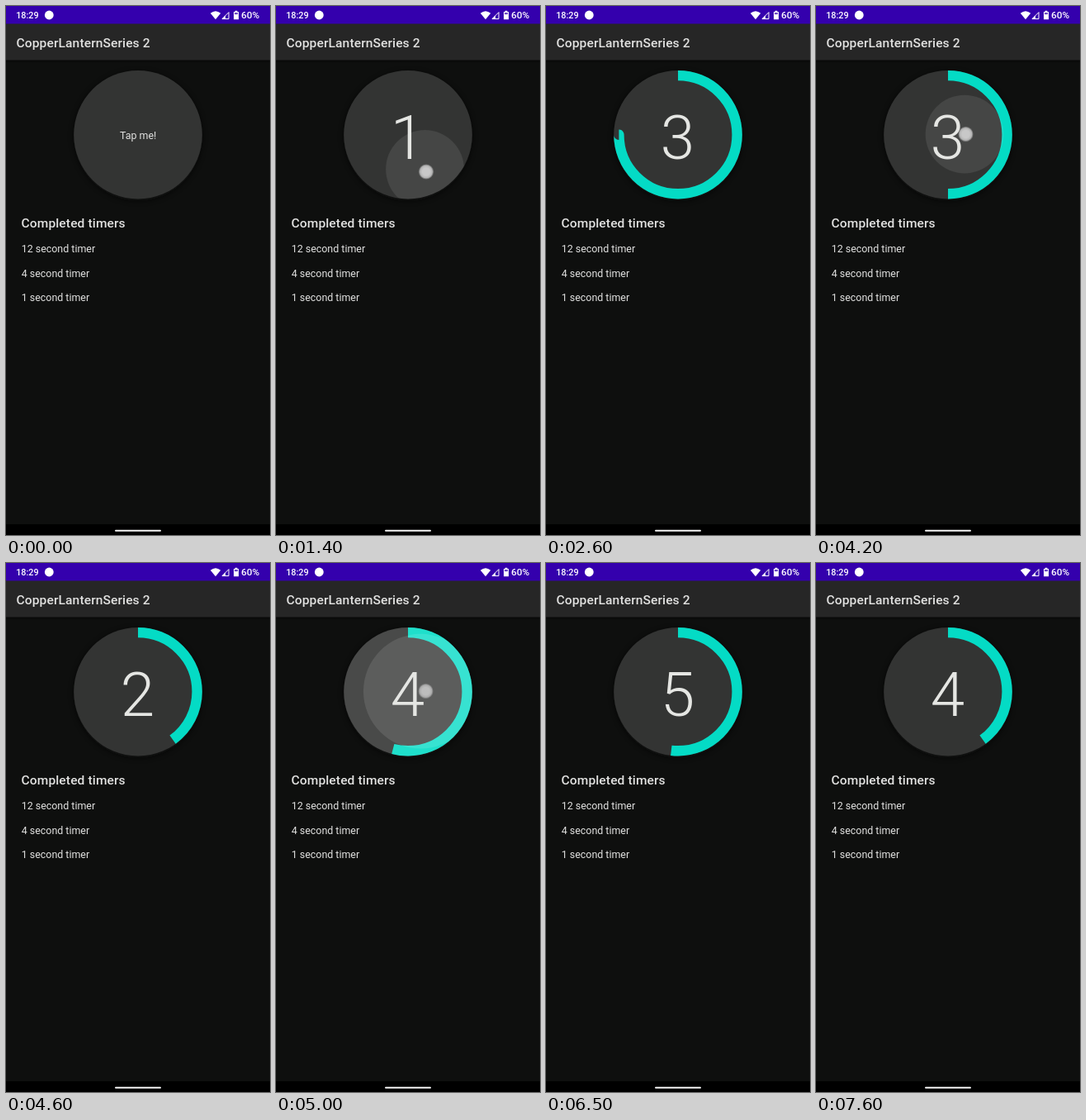
Recreate the animation shown at these times as an HTML page. Size 320x640 px, loop 8000 ms.

```html
<!DOCTYPE html>
<html lang="en">
<head>
<meta charset="utf-8">
<title>Tap timer</title>
<style>
  html, body { margin: 0; width: 100%; height: 100%; overflow: hidden; background: #0e0f0e; }
  svg { display: block; width: 320px; height: 640px; }
  text { font-family: Roboto, sans-serif; font-size: 12.45px; fill: #e2e2e1; }
  .status { font-size: 10.8px; font-weight: 500; fill: #fff; }
  .heading { font-size: 15.56px; font-weight: 500; letter-spacing: .12px; }
  #count { font-size: 74.7px; font-weight: 300; fill: #e5e6e3; }
  .middle { text-anchor: middle; }
</style>
</head>
<body>
<svg viewBox="0 0 320 640">
  <defs>
    <clipPath id="disc"><circle cx="160" cy="155.7" r="77.8"/></clipPath>
    <linearGradient id="barShade" x2="0" y2="1">
      <stop stop-color="#060606"/>
      <stop offset="1" stop-color="#0e0f0e"/>
    </linearGradient>
    <radialGradient id="touch">
      <stop offset=".5" stop-color="#c8c8c8"/>
      <stop offset=".8" stop-color="#b4b4b4"/>
      <stop offset="1" stop-color="#999" stop-opacity=".3"/>
    </radialGradient>
    <filter id="soft" x="-20%" y="-20%" width="140%" height="140%">
      <feGaussianBlur stdDeviation="3"/>
    </filter>
  </defs>

  <rect width="320" height="640" fill="#0e0f0e"/>
  <rect y="65" width="320" height="4" fill="url(#barShade)"/>
  <rect y="21" width="320" height="44.5" fill="#262626"/>
  <rect width="320" height="21.5" fill="#3400ad"/>
  <rect y="627" width="320" height="13"/>
  <rect x="132" y="633.8" width="56" height="2" rx="1" fill="#f4f4f4"/>

  <text class="status" x="12.2" y="15.3">18:29</text>
  <g fill="#fff">
    <circle cx="52.3" cy="11" r="5.4"/>
    <path d="M247.8 8.7Q254 3.6 260.2 8.7L254 16.2Z"/>
    <path d="M262 15.6L270 7.6V15.6Z" fill="none" stroke="#fff"/>
    <path d="M266 11.6V15.6H262Z"/>
    <path d="M276 7h1.6V5.8h2.8V7h1.6v9.2h-6Z"/>
    <path d="M277 8h4v2.2h-4Z" fill="#3400ad" opacity=".7"/>
  </g>
  <text class="status" x="285" y="15.3" style="font-size:11.8px">60%</text>
  <text class="heading" x="12.5" y="50">CopperLanternSeries 2</text>

  <circle cx="160" cy="157.5" r="78.5" fill="#070707" opacity=".6" filter="url(#soft)"/>
  <circle cx="160" cy="155.7" r="77.8" fill="#333433"/>
  <circle id="ring" cx="160" cy="155.7" r="71.6" fill="none" stroke="#04dbc5" stroke-width="12.4"
          pathLength="360" transform="rotate(-90 160 155.7)"/>
  <g id="ripples" clip-path="url(#disc)" fill="#fff"></g>
  <text id="label" class="middle" x="160.2" y="161">Tap me!</text>
  <text id="count" class="middle" x="159.4" y="184.7"></text>
  <circle id="dot" r="9.2" fill="url(#touch)"/>

  <text class="heading" x="18.5" y="268">Completed timers</text>
  <text x="18.7" y="298.4">12 second timer</text>
  <text x="18.7" y="327.6">4 second timer</text>
  <text x="18.7" y="356.8">1 second timer</text>
</svg>
<script>
  const LOOP = 8000, STEP = 100, PRESS_LEAD = 15, SETTLED = 0.01;
  const CENTER = { x: 160, y: 155.7 };
  const taps = [
    ...[1400, 1570, 1730, 1900].map(at => ({ at, x: 182, y: 200.5 })),
    ...[4200, 4800, 4950, 5100, 5250, 5400].map(at => ({ at, x: 181.5, y: 155 }))
  ];
  const ticks = Array.from({ length: 6 }, (_, i) => ({ at: 2420 + i * 1000, tick: true }));
  const events = [...taps, ...ticks].sort((a, b) => a.at - b.at);

  const $ = id => document.getElementById(id);
  const clamp = v => Math.min(1, Math.max(0, v));
  const mix = (a, b, p) => a + (b - a) * p;
  const set = (el, attrs) => Object.entries(attrs).forEach(([k, v]) => el.setAttribute(k, v));

  const ripples = taps.map(() =>
    $('ripples').appendChild(document.createElementNS('http://www.w3.org/2000/svg', 'circle')));

  // Critically damped spring, starting at rest and snapping once close
  const spring = (from, to, ms) => {
    const w = ms * 0.0387;
    const gap = (from - to) * (1 + w) * Math.exp(-w);
    return Math.abs(gap) < SETTLED ? to : to + gap;
  };

  // cubic-bezier(.4, 0, .2, 1)
  const fastOutSlowIn = p => {
    let lo = 0, hi = 1, u = .5;
    for (let i = 0; i < 16; i++) {
      u = (lo + hi) / 2;
      const x = 3 * (1 - u) ** 2 * u * .4 + 3 * (1 - u) * u * u * .2 + u ** 3;
      if (x < p) lo = u; else hi = u;
    }
    return 3 * (1 - u) * u * u + u ** 3;
  };

  function timerAt(t) {
    let left = 0, total = 0, progress = 0, target = 0, since = 0;
    for (const e of events) {
      if (e.at > t) break;
      progress = spring(progress, target, e.at - since);
      since = e.at;
      if (e.tick) left--;
      else { left++; total++; }
      target = left / total;
    }
    return { left, progress: spring(progress, target, t - since) };
  }

  function drawRipple(el, tap, age) {
    const p = clamp(age / 225);
    const alpha = age < 0 ? 0 : clamp(age / 18) * clamp((375 - age) / 150);
    set(el, {
      cx: mix(tap.x, CENTER.x, p),
      cy: mix(tap.y, CENTER.y, p),
      r: mix(46.7, 114, fastOutSlowIn(p)),
      opacity: alpha * 0.105
    });
  }

  function draw(t) {
    const { left, progress } = timerAt(t);
    $('label').style.display = left ? 'none' : '';
    $('count').textContent = left || '';
    const sweep = progress * 360;
    $('ring').style.display = sweep > 0.1 ? '' : 'none';
    set($('ring'), { 'stroke-dasharray': sweep > 359 ? 'none' : `${sweep} 360` });

    let dotAlpha = 0;
    taps.forEach((tap, i) => {
      const age = t - tap.at + PRESS_LEAD;
      drawRipple(ripples[i], tap, age);
      if (age >= 0 && age < 155) {
        dotAlpha = clamp((155 - age) / 100);
        set($('dot'), { cx: tap.x, cy: tap.y });
      }
    });
    set($('dot'), { opacity: dotAlpha });
  }

  const start = performance.now();
  function frame() {
    const t = (performance.now() - start) % LOOP;
    draw(Math.floor(t / STEP) * STEP);
    requestAnimationFrame(frame);
  }
  frame();
</script>
</body>
</html>
```
